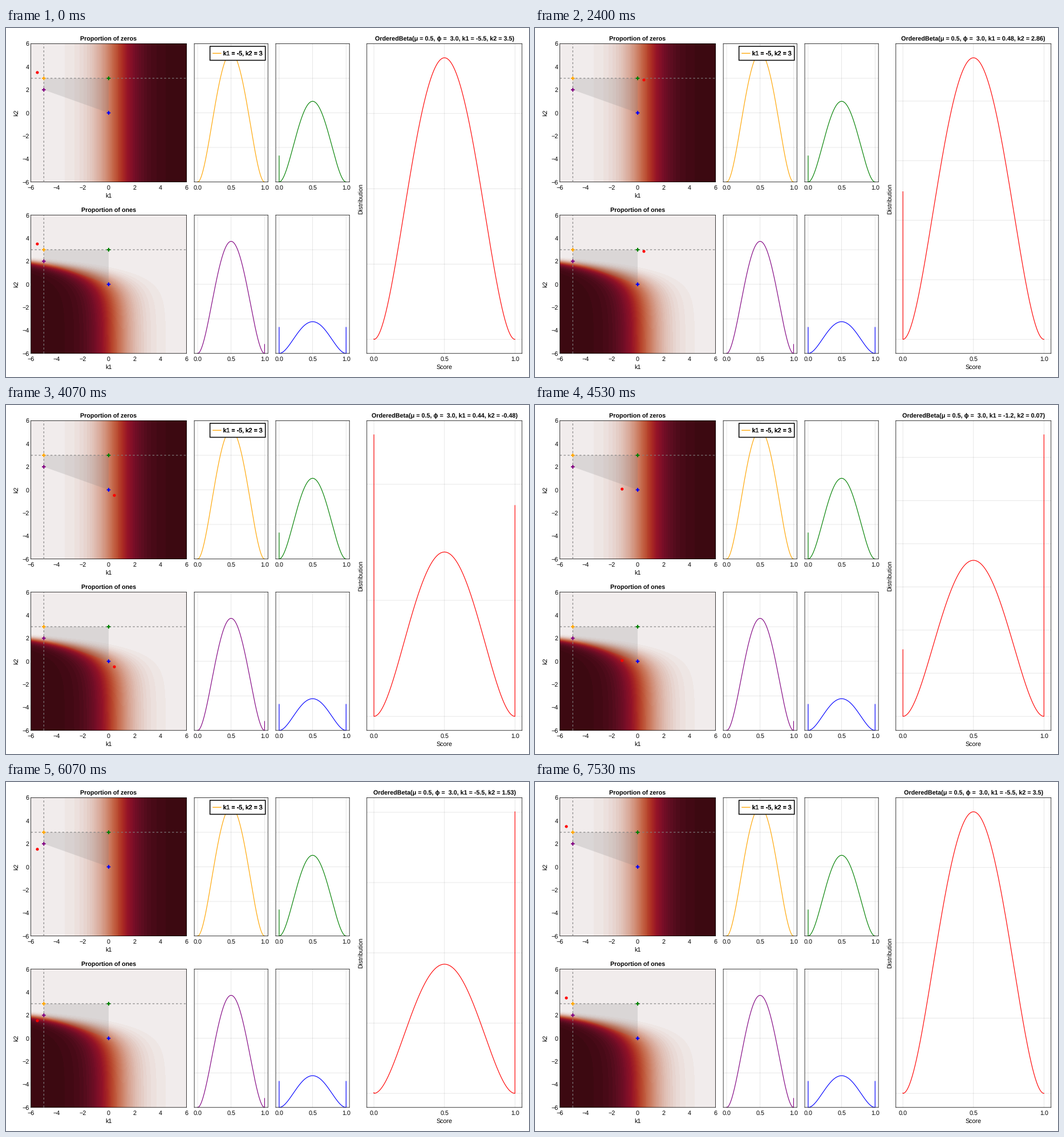
Recreate the animation shown at these times as a matplotlib script. Size 917 by 611 pixels, loop 7.99 s.

```python
import matplotlib.pyplot as plt
import numpy as np
from matplotlib.animation import FuncAnimation
from matplotlib.colors import LinearSegmentedColormap
from matplotlib.patches import Ellipse, Polygon, Rectangle

W, H = 1200, 800  # layout units
PX_W, PX_H, DPI = 917, 611, 64
PT = 72 / DPI * PX_W / W  # points per layout unit
FRAMES, LOOP_MS = 120, 7990
MU, PHI = 0.5, 3.0

plt.rcParams.update({
    "font.family": ["Liberation Sans", "DejaVu Sans"],
    "font.size": 14 * PT,
    "text.hinting": "no_hinting",
    "path.snap": False,
    "axes.linewidth": PT,
    "lines.linewidth": 1.5 * PT,
})

AMP = LinearSegmentedColormap.from_list("amp", [
    "#f1ecec", "#e6d1cb", "#ddb6aa", "#d59c89", "#cd8167", "#c46649",
    "#ba4a2f", "#ac2c24", "#951327", "#780e28", "#590d1f", "#3c0911"], N=256)

CORNERS = [(-5, 3, "orange"), (0, 3, "green"), (0, 0, "blue"), (-5, 2, "purple")]
ROWS = ((36, 353), (429, 746))
HEAT = (57, 414)
SMALL = ((432, 601), (619, 788))
MAIN = (828, 1184)

fig = plt.figure(figsize=(PX_W / DPI, PX_H / DPI), dpi=DPI, facecolor="white")


def sigmoid(v):
    return 1 / (1 + np.exp(-v))


def p_zero(k1, k2):
    return sigmoid(k1 - MU + 0 * k2)


def p_one(k1, k2):
    return sigmoid(MU - k1 - np.exp(k2))


X = np.concatenate([[0], np.linspace(1e-4, 1 - 1e-4, 301), [1]])


def density(k1, k2):
    """Ordered beta: point masses at 0 and 1, Beta(3, 3) between."""
    p0, p1 = p_zero(k1, k2), p_one(k1, k2)
    y = (1 - p0 - p1) * 30 * X**2 * (1 - X)**2
    y[0], y[-1] = p0, p1
    return y


def text(x, y, s, **kw):
    kw = {"ha": "center", "va": "baseline", **kw}
    return fig.text(x / W, 1 - y / H, s, **kw)


def side_label(x, y, s):
    text(x, y, s, rotation=90, rotation_mode="anchor")


def panel(cols, rows, xlim, ylim):
    (left, right), (top, bottom) = cols, rows
    ax = fig.add_axes([left / W, 1 - bottom / H,
                       (right - left) / W, (bottom - top) / H])
    ax.set(xlim=xlim, ylim=ylim, xticks=[], yticks=[])
    return ax


def grid_line(line, v):
    return line(v, color="black", alpha=0.12, lw=PT, zorder=0.5)


def unit_ticks(ax, cols, bottom):
    left, right = cols
    for v in (0, 0.5, 1):
        grid_line(ax.axvline, v)
        text(left + (v + 0.05) / 1.1 * (right - left), bottom + 17.2, f"{v:.1f}")


def heat_panel(rows, title, prob):
    (left, right), (top, bottom) = HEAT, rows
    ax = panel(HEAT, rows, (-6, 6), (-6, 6))
    ux, uy = 12 / (right - left), 12 / (bottom - top)  # data per layout unit

    g1, g2 = np.meshgrid(np.linspace(-6, 6, 547), np.linspace(-6, 6, 485))
    bands = np.floor(prob(g1, g2) * 50) / 49
    ax.imshow(bands, cmap=AMP, vmin=0, vmax=1, extent=(-6, 6, -6, 6),
              origin="lower", aspect="auto", interpolation="nearest")
    ax.add_patch(Polygon([c[:2] for c in CORNERS], fc="gray", ec="none",
                         alpha=0.2, zorder=2))
    dash = dict(color="gray", ls=(0, (3, 3)), zorder=3)
    ax.axvline(-5, **dash)
    ax.axhline(3, **dash)
    for k1, k2, color in CORNERS:
        for w, h in ((8.5 * ux, 2.8 * uy), (2.8 * ux, 8.5 * uy)):
            ax.add_patch(Rectangle((k1 - w / 2, k2 - h / 2), w, h,
                                   fc=color, ec="none", zorder=4))

    for v in range(-6, 7, 2):
        s = str(v).replace("-", "−")
        text(left + (v + 6) / ux, bottom + 17.2, s)
        text(left - 4, bottom - (v + 6) / uy + 5.1, s, ha="right")
    mid = (left + right) / 2
    text(mid, top - 6.7, title, weight="bold")
    text(mid, bottom + 35.9, "k1")
    side_label(28.5, (top + bottom) / 2, "k2")
    return ax.add_patch(Ellipse((0, 0), 6.75 * ux, 6.75 * uy, fc="red",
                                ec="none", zorder=5))


def curve_panel(cols, rows, corner):
    k1, k2, color = corner
    ax = panel(cols, rows, (-0.05, 1.05), (0, 2))
    unit_ticks(ax, cols, rows[1])
    for v in (0.5, 1, 1.5):
        grid_line(ax.axhline, v)
    ax.plot(X, density(k1, k2), color=color)


def add_legend():
    ax = panel((0, W), (0, H), (0, W), (H, 0))
    ax.axis("off")
    ax.add_patch(Rectangle((468, 42), 127, 32, fc="white", ec="black",
                           lw=2 * PT))
    ax.plot([474, 494], [58, 58], color="orange", lw=1.7 * PT,
            solid_capstyle="butt")
    # Stacked labels give the heavy edges of overlapping legends.
    for _ in range(4):
        ax.text(499, 63.1, "k1 = -5, k2 = 3")


def tick_step(top):
    """Pick a tick step by granularity, coverage and niceness."""
    best, step = -1, 1
    for scale in (0.01, 0.1, 1):
        for q, nice in ((1, 1), (5, 0.9), (2, 0.7), (2.5, 0.5), (3, 0.2)):
            s = q * scale
            n = int(1.05 * top / s) + 1
            if n < 3:
                continue
            grain = max(0, 1 - abs(n - 5) / 5)
            cover = 1.5 * 1.1 * top / ((n - 1) * s)
            score = grain / 4 + cover / 3 + nice / 4
            if score > best:
                best, step = score, s
    return step


def ease(n, start, a, b):
    """Cosine move over a fifth of the loop, frozen on its last step."""
    last = int((start + 0.2) * (FRAMES - 1))
    t = max(0, (min(n, last) / (FRAMES - 1) - start) / 0.2)
    return a + (b - a) * (1 - np.cos(np.pi * t)) / 2


def cutpoints(n):
    if n < 60:
        return ease(n, 0, -5.5, 0.5), ease(n, 0.25, 3.5, -0.5)
    k1 = ease(n, 0.5, 0.5, -5.5)
    if n < 90:
        return k1, ease(n, 0.5, -0.5, 1.5)
    return k1, ease(n, 0.75, 1.5, 3.5)


dots = [heat_panel(ROWS[0], "Proportion of zeros", p_zero),
        heat_panel(ROWS[1], "Proportion of ones", p_one)]
for corner, row, col in zip(CORNERS, (0, 0, 1, 1), (0, 1, 1, 0)):
    curve_panel(SMALL[col], ROWS[row], corner)
add_legend()

main = panel(MAIN, (36, 746), (-0.05, 1.05), (0, 1))
unit_ticks(main, MAIN, 746)
rules = [grid_line(main.axhline, 0) for _ in range(12)]
curve, = main.plot([], [], color="red")
title = text(1006, 29.3, "", weight="bold")
text(1006, 781.9, "Score")
side_label(819, 391, "Distribution")


def update(n):
    k1, k2 = cutpoints(n)
    for dot in dots:
        dot.set_center((k1, k2))
    y = density(k1, k2)
    peak = y.max()
    curve.set_data(X, y)
    main.set_ylim(-0.05 * peak, 1.05 * peak)
    step = tick_step(peak)
    for i, rule in enumerate(rules):
        rule.set_ydata([i * step] * 2)
        rule.set_visible(i * step <= 1.05 * peak)
    title.set_text(f"OrderedBeta(μ = {MU}, ϕ =  {PHI}, "
                   f"k1 = {round(float(k1), 2)}, k2 = {round(float(k2), 2)})")
    return [*dots, curve, title, *rules]


ani = FuncAnimation(fig, update, frames=FRAMES, interval=LOOP_MS / FRAMES,
                    repeat=True, repeat_delay=0, blit=False)
plt.show()
```
